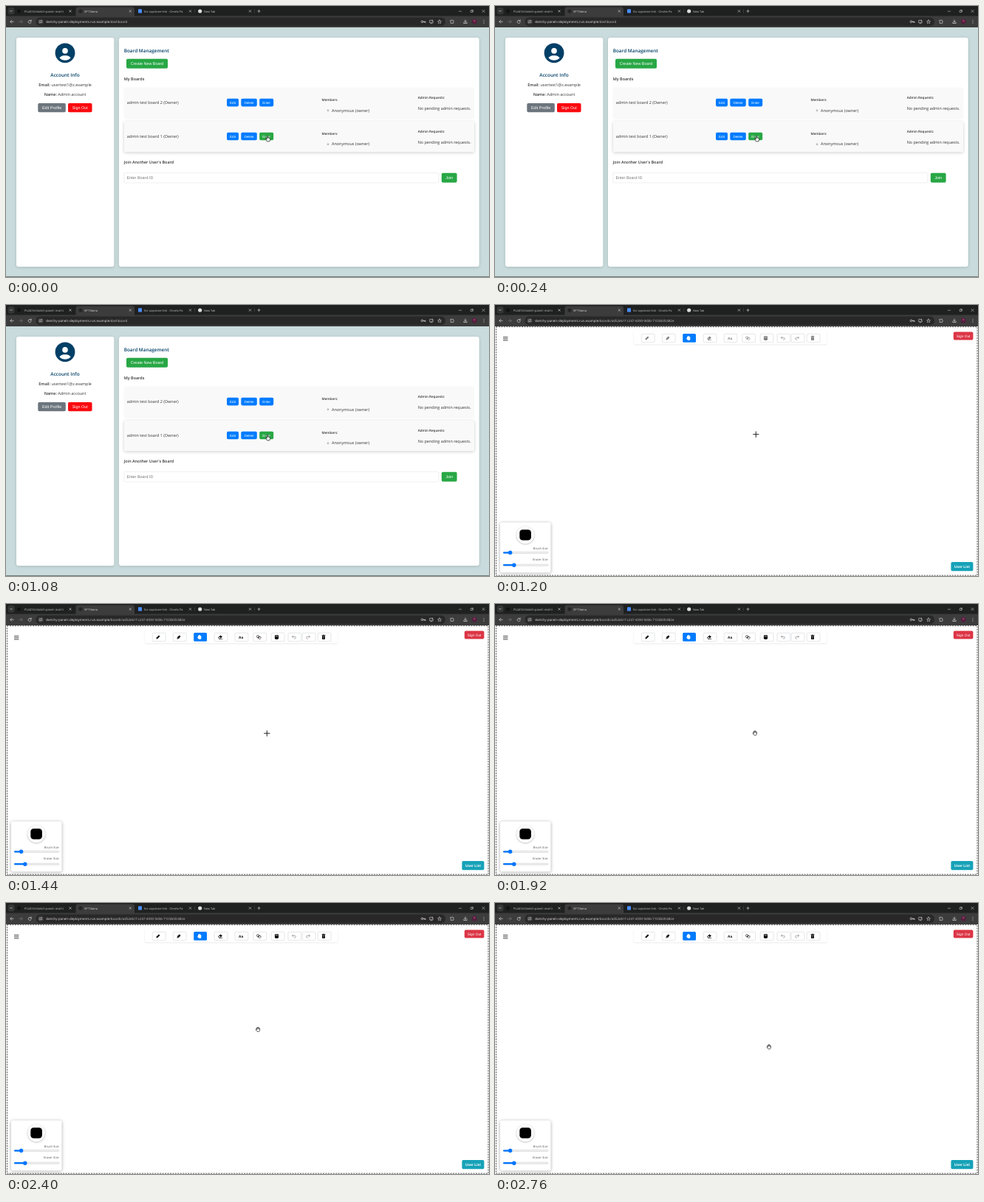
Animation of 654x368 px, one loop 2.88 s. Source, as an HTML page with a canvas:

```html
<!DOCTYPE html>
<html lang="en">
<head>
<meta charset="utf-8">
<title>Board</title>
<style>
html, body { margin: 0; width: 100%; height: 100%; overflow: hidden; background: #fff; }
canvas { display: block; width: 654px; height: 368px; }
</style>
</head>
<body>
<canvas id="stage"></canvas>
<script>
const W = 654, H = 368, LOOP = 2880, STEP = 120;
const canvas = document.getElementById('stage');
const c = canvas.getContext('2d');
const dpr = window.devicePixelRatio || 1;
canvas.width = W * dpr;
canvas.height = H * dpr;

const OPEN = '"Open Sans", sans-serif';
const ARIAL = '"Liberation Sans", Arial, sans-serif';
const NAVY = '#003f66', BLUE = '#007bff', GREEN = '#28a745';
const HOST = 'sketchy-panels-deployments.run.example';

function text(s, x, y, size, color, o = {}) {
  c.font = `${o.weight || 400} ${size}px ${o.font || OPEN}`;
  c.textAlign = o.align || 'left';
  c.fillStyle = color;
  c.fillText(s, x, y);
}

function box(x, y, w, h, r, fill, stroke, lw = 0.4) {
  c.beginPath();
  c.roundRect(x, y, w, h, r);
  if (fill) { c.fillStyle = fill; c.fill(); }
  if (stroke) { c.strokeStyle = stroke; c.lineWidth = lw; c.stroke(); }
}

function shadowBox(x, y, w, h, r, fill, blur, alpha, dy = 1) {
  c.save();
  c.shadowColor = `rgba(0,0,0,${alpha})`;
  c.shadowBlur = blur * dpr;
  c.shadowOffsetY = dy * dpr;
  box(x, y, w, h, r, fill);
  c.restore();
}

function dot(x, y, r, fill, stroke, lw = 0.6) {
  c.beginPath();
  c.arc(x, y, r, 0, Math.PI * 2);
  if (fill) { c.fillStyle = fill; c.fill(); }
  if (stroke) { c.strokeStyle = stroke; c.lineWidth = lw; c.stroke(); }
}

// Draws SVG path data at a position and scale
function shape(d, x, y, k, fill, stroke, lw = 0.6) {
  c.save();
  c.translate(x, y);
  c.scale(k, k);
  c.lineJoin = c.lineCap = 'round';
  const p = new Path2D(d);
  if (fill) { c.fillStyle = fill; c.fill(p); }
  if (stroke) { c.strokeStyle = stroke; c.lineWidth = lw / k; c.stroke(p); }
  c.restore();
}

const line = (d, x, y, color, lw) => shape(d, x, y, 1, null, color, lw);

function button(s, x, y, w, h, fill, size = 5.45, weight = 400) {
  box(x, y, w, h, 1.8, fill);
  text(s, x + w / 2, y + h / 2 + size * 0.35, size, '#fff', { font: ARIAL, align: 'center', weight });
}

/* ---------- browser frame ---------- */

function browser(path) {
  const ink = '#d6d6d6', dim = '#777';
  c.fillStyle = '#1f2020';
  c.fillRect(0, 0, W, 14);
  c.fillStyle = '#3c3c3c';
  c.fillRect(0, 13.5, W, 15.5);
  box(94.5, 1.5, 79.5, 13, [3, 3, 0, 0], '#3c3c3c');

  box(2.5, 2, 9, 9.5, 3, '#343535');
  line('M-1.3-.6L0 .7L1.3-.6', 7, 6.8, ink, 0.7);

  dot(17.5, 7, 2.6, '#121313');
  dot(101, 7, 2.6, '#242525');
  box(179, 4.2, 5, 5.4, 0.7, '#4a8df6');
  dot(262.7, 7, 2.6, '#dedede');

  text('PL4416/sketch-panel: real-ti', 25, 8.5, 4.1, '#c4c4c4');
  text('SP Tiloma', 106, 8.5, 3.95, '#e3e3e3');
  text('for capstone link - Orvelo Pa', 187, 8.5, 4, '#c4c4c4');
  text('New Tab', 268, 8.5, 3.9, '#c4c4c4');
  for (const x of [87, 168.3, 249.5, 330.5])
    line('M-1.3-1.3L1.3 1.3M1.3-1.3L-1.3 1.3', x, 7, ink, 0.6);
  c.fillStyle = '#555';
  c.fillRect(255, 4.5, 0.5, 5);
  c.fillRect(336, 4.5, 0.5, 5);
  line('M-1.8 0H1.8M0-1.8V1.8', 342.5, 7, ink, 0.6);

  line('M-1.7 0H1.7', 615, 7.2, ink, 0.5);
  line('M-1.5-.8H.8V1.5H-1.5ZM-.7-1.5H1.5V.8', 631, 7, ink, 0.5);
  line('M-1.7-1.7L1.7 1.7M1.7-1.7L-1.7 1.7', 646.5, 7, ink, 0.5);

  line('M2.2 0H-2M-.2-2L-2.2 0L-.2 2', 8, 21.3, ink, 0.7);
  line('M-2.2 0H2M.2-2L2.2 0L.2 2', 20, 21.3, dim, 0.7);
  line('M1.7-1.2A2.1 2.1 0 1 0 2.1.6M2-2.3V-.8H.5', 32.2, 21.3, ink, 0.7);

  box(40.5, 15.6, 554.5, 11.6, 5.8, '#282828');
  dot(47, 21.3, 3.8, '#3c3c3c');
  line('M-2-1.1H.3M-.2 1.1H2', 47, 21.3, ink, 0.6);
  dot(48.3, 20.2, 0.7, null, ink, 0.5);
  dot(45.7, 22.4, 0.7, null, ink, 0.5);
  text(HOST, 54, 23, 4.45, '#e6e6e6');
  const w = c.measureText(HOST).width;
  text(path, 54 + w, 23, 4.45, '#c6c6c6');

  dot(563.5, 21.3, 1.3, null, ink, 0.8);
  line('M0 0H3.2V1.2M2 0V1', 564.8, 21.3, ink, 0.8);
  line('M.5-2H-2.3V1.4H2.3V.4M-1 2.4H1M1.5-2.4V-.4M.6-1.2L1.5-.3L2.4-1.2', 576, 21.3, ink, 0.6);
  line('M0-2.5L.7-.8L2.5-.7L1.1.5L1.6 2.3L0 1.3L-1.6 2.3L-1.1.5L-2.5-.7L-.7-.8Z', 587, 21.4, ink, 0.55);
  line('M-2-1.4H-.7A.7.7 0 0 1 .8-1.4H1.7V0A.7.7 0 0 1 1.7 1.4V2.4H-2V1.3A.8.8 0 0 0-2-.2Z', 604, 21, ink, 0.65);
  line('M0-2.4V.7M-1.4-.6L0 .8L1.4-.6M-2.2 1V2.2H2.2V1', 622, 21.3, ink, 0.7);
  dot(634.3, 21.2, 3.4, '#54203f');
  dot(634.3, 20, 1.3, '#a03a68');
  for (const y of [19.3, 21.3, 23.3]) dot(647, y, 0.5, ink);
}

/* ---------- dashboard ---------- */

const BODY = 'M399 384.2C376.9 345.8 335.4 320 288 320H224C176.6 320 135.1 345.8 113 384.2C148.2 423.4 199.2 448 256 448S363.8 423.3 399 384.2Z';
const POINTER = 'M-.9-3.3C-.9-4.3.5-4.3.5-3.3V-.8C.9-1.3 1.6-1.2 1.7-.6C2.1-1 2.8-.8 2.8-.2C3.3-.5 3.8-.1 3.8.4V2C3.8 3 3 3.4 3 4.3H-.6C-.8 3.1-2.4 1.6-2.6.7C-2.7.1-1.9-.2-.9.9Z';

function row(name, y, hover) {
  if (hover) shadowBox(160, y, 474, 41.5, 1.8, '#f9f9f9', 4, 0.2);
  else shadowBox(160, y, 474, 41.5, 1.8, '#f9f9f9', 2, 0.06, 0.4);
  text(name, 163.8, y + 22.2, 5.45, '#333');
  const by = y + 15;
  button('Edit', 299, by, 16, 10.6, BLUE, 4.54);
  button('Delete', 318.3, by, 21.5, 10.6, BLUE, 4.54);
  button('Enter', 343.2, by, 19, 10.6, hover ? GREEN : BLUE, 4.54);
  text('Members:', 427.5, y + 18, 4.53, '#333', { weight: 600 });
  dot(436, y + 31, 1, null, '#555', 0.4);
  text('Anonymous (owner)', 441, y + 32.7, 5.45, '#333');
  text('Admin Requests:', 557.7, y + 15.3, 4.53, '#333', { weight: 600 });
  text('No pending admin requests.', 557.7, y + 29.9, 5.45, '#333');
}

// Bold label and plain value, centred together
function pair(label, value, cx, y) {
  const size = 5.45;
  c.font = `600 ${size}px ${OPEN}`;
  const a = c.measureText(label).width;
  c.font = `400 ${size}px ${OPEN}`;
  const x = cx - (a + c.measureText(value).width) / 2;
  text(label, x, y, size, '#333', { weight: 600 });
  text(value, x + a, y, size, '#333');
}

function dashboard() {
  c.fillStyle = '#c9dbdc';
  c.fillRect(0, 29, W, H - 29);
  shadowBox(14, 43, 132.3, 311, 3, '#fff', 4, 0.15);
  shadowBox(153, 43, 487.7, 311, 3, '#fff', 4, 0.15);

  dot(80, 63.8, 13.4, NAVY);
  dot(80, 60.9, 3.8, '#fff');
  shape(BODY, 80 - 13.4, 63.8 - 13.4, 26.8 / 512, '#fff');
  text('Account Info', 80, 95.8, 6.45, NAVY, { weight: 600, align: 'center' });
  pair('Email:', ' usertest1@z.example', 80, 108.7);
  pair('Name:', ' Admin account', 80, 121.8);
  button('Edit Profile', 43.3, 132, 37.5, 12.2, '#6c757d');
  button('Sign Out', 84, 132, 32.5, 12.2, '#fa0a0f');

  text('Board Management', 159.7, 63.3, 6.4, NAVY, { weight: 600 });
  button('Create New Board', 163, 71.8, 56, 13, GREEN);
  text('My Boards', 159.7, 100.9, 5.45, '#333', { weight: 600 });
  row('admin test board 2 (Owner)', 110.8, false);
  row('admin test board 1 (Owner)', 156.7, true);
  text("Join Another User's Board", 159.7, 214.2, 5.45, '#333', { weight: 600 });
  box(159.8, 226.6, 426, 13.4, 1.7, '#fff', '#d4d4d4', 0.4);
  text('Enter Board ID', 163.4, 235.2, 5.45, '#757575', { font: ARIAL });
  button('Join', 589.8, 226.8, 20.8, 13, GREEN);

  c.fillStyle = '#5c6464';
  c.fillRect(0, 367.2, W, 0.8);
  shape(POINTER, 354, 179.8, 0.95, '#fff', '#111', 0.7);
}

/* ---------- drawing board ---------- */

function slider(y, x) {
  box(11, y - 1.1, 61, 2.2, 1.1, '#efefef', '#b2b2b2', 0.3);
  box(11, y - 1.1, x - 11, 2.2, 1.1, '#0075ff');
  dot(x, y, 2.7, '#0075ff');
}

function tool(x, alpha, icon) {
  c.globalAlpha = 1;
  box(x, 39.3, 17.8, 11.4, 1.5, '#fff', '#c4c8cc', 0.45);
  c.globalAlpha = alpha;
  icon();
  c.globalAlpha = 1;
}

const MITT = 'M-2-.1V-1.6C-2-2.2-1.2-2.2-1.2-1.6V-2.3C-1.2-2.9-.3-2.9-.3-2.3V-2.6C-.3-3.1.6-3.1.6-2.6V-2.2C.7-2.7 1.5-2.6 1.5-2V-1.2C1.7-1.7 2.4-1.5 2.4-.9V.9C2.4 2.3 1.6 3 .5 3H0C-1 3-1.5 2.5-2 1.8L-2.8.4C-3-.1-2.3-.5-2-.1Z';

function tools(alpha) {
  const k = '#000';
  shadowBox(188, 35.3, 261, 18.2, 1.5, '#fff', 2, 0.13, 0.6);
  tool(198.3, alpha, () => shape('M-2.6 2.6L-2.1.6L1-2.4L2.4-1L-.6 2.1Z', 206, 45, 1, k));
  tool(226.3, alpha, () => {
    shape('M-2.7 2.7L-1.8-.3L1-2.4L2.4-1L.3 1.8Z', 234, 45, 1, k);
    line('M-2.4 2.4L-.3.3', 234, 45, '#fff', 0.35);
  });
  box(254.2, 39.1, 17.8, 11.6, 1.5, BLUE);
  shape(MITT, 262, 45, 1, '#fff');
  tool(282.2, alpha, () => {
    shape('M-2.8.6L.6-2.5L2.8-.4L-.2 2.4H-1.4Z', 290, 45, 1, k);
    shape('M-2 .7L-.8-.3L.8 1.3L-.4 2H-1Z', 290, 45, 1, '#fff');
    line('M-1.2 2.5H2.8', 290, 45, k, 0.6);
  });
  tool(310.1, alpha, () => text('Aa', 318, 46.8, 4.8, k, { font: ARIAL, align: 'center', weight: 700 }));
  tool(334.8, alpha, () => {
    dot(341.2, 44.3, 1.7, null, k, 0.6);
    line('M-1-.9H1.6L2.3.7L.7 2.2L-1.3 1Z', 343, 45.5, k, 0.6);
  });
  tool(359.2, alpha, () => {
    box(363.9, 42.2, 5.2, 2.6, [1.2, 1.2, 0, 0], k);
    box(363.9, 45.1, 5.2, 2.8, [0, 0, 1.6, 1.6], k);
    line('M-1.2-.8H1.2', 366.5, 44.3, '#fff', 0.45);
  });
  const bend = 'M-.9-2L-2.5-.6L-.9.8M-2.4-.6H1A1.4 1.4 0 0 1 1 2.2H.3';
  tool(382, 0.5, () => line(bend, 390, 45, '#222', 0.65));
  tool(401.2, 0.5, () => {
    c.save();
    c.translate(409, 45);
    c.scale(-1, 1);
    line(bend, 0, 0, '#222', 0.65);
    c.restore();
  });
  tool(422.2, alpha, () => {
    box(427.6, 42.3, 4.8, 1, 0.3, k);
    box(429.1, 41.8, 1.8, 0.8, 0.3, k);
    box(428, 43.6, 4, 4.4, [0, 0, 0.7, 0.7], k);
    line('M-.7-1V1.2M.7-1V1.2', 430, 45.7, '#fff', 0.35);
  });
}

function board(alpha) {
  c.fillStyle = '#fff';
  c.fillRect(0, 29, W, H - 29);
  c.save();
  c.strokeStyle = '#222';
  c.lineWidth = 0.75;
  c.setLineDash([2.1, 1.35]);
  c.strokeRect(1.5, 29.7, 651.5, 337.5);
  c.restore();
  line('M-2.8-2.2H2.8M-2.8 0H2.8M-2.8 2.2H2.8', 14.2, 45.8, '#222', 0.8);
  tools(alpha);
  button('Sign Out', 620.8, 36.6, 26.6, 11, '#dc3545', 4.75);
  button('User List', 617.4, 348.9, 30, 12.3, '#17a2b8', 4.9, 700);

  shadowBox(7, 295.3, 68.5, 68.2, 2.7, '#fff', 4, 0.35, 0.6);
  shadowBox(29.3, 300.5, 23.6, 23.6, 11.8, '#fff', 2.5, 0.3, 0.7);
  box(33.3, 305, 15.6, 14.6, 4.2, '#000');
  text('Brush Size', 71.6, 331.5, 4.1, '#555', { align: 'right' });
  text('Eraser Size', 71.6, 346.8, 4.1, '#555', { align: 'right' });
  slider(336.3, 20.6);
  slider(353.2, 25.8);
}

function grab(x, y) {
  shape(MITT, x, y, 1, '#fff', '#111', 0.7);
  line('M-1.2-1.6V-.3M-.3-2V-.4M.6-2V-.4M1.5-1.4V-.3', x, y, '#222', 0.4);
}

/* ---------- timeline ---------- */

// Drag path: start time, x, y
const path = [[1920, 352, 175.3], [2400, 341.2, 171.7], [2520, 342, 166], [2640, 356, 179], [2760, 371, 195.3]];

function draw(now) {
  const t = Math.floor((now % LOOP) / STEP) * STEP;
  c.setTransform(dpr, 0, 0, dpr, 0, 0);
  c.textRendering = 'geometricPrecision';
  c.clearRect(0, 0, W, H);
  if (t < 1200) {
    dashboard();
    browser('/dashboard');
  } else {
    board(Math.min(1, 0.5 + (t - 1200) / 480));
    browser('/boards/ad52eb1f-c247-4590-9d36-7103b5fc482e');
    if (t < 1920) {
      line('M-3.7 0H3.7M0-3.7V3.7', 353.3, 175.7, '#111', 0.9);
    } else {
      const [, x, y] = path.filter(p => p[0] <= t).pop();
      grab(x, y);
    }
  }
}

const start = performance.now();
function tick() {
  draw(performance.now() - start);
  requestAnimationFrame(tick);
}
tick();
</script>
</body>
</html>
```
